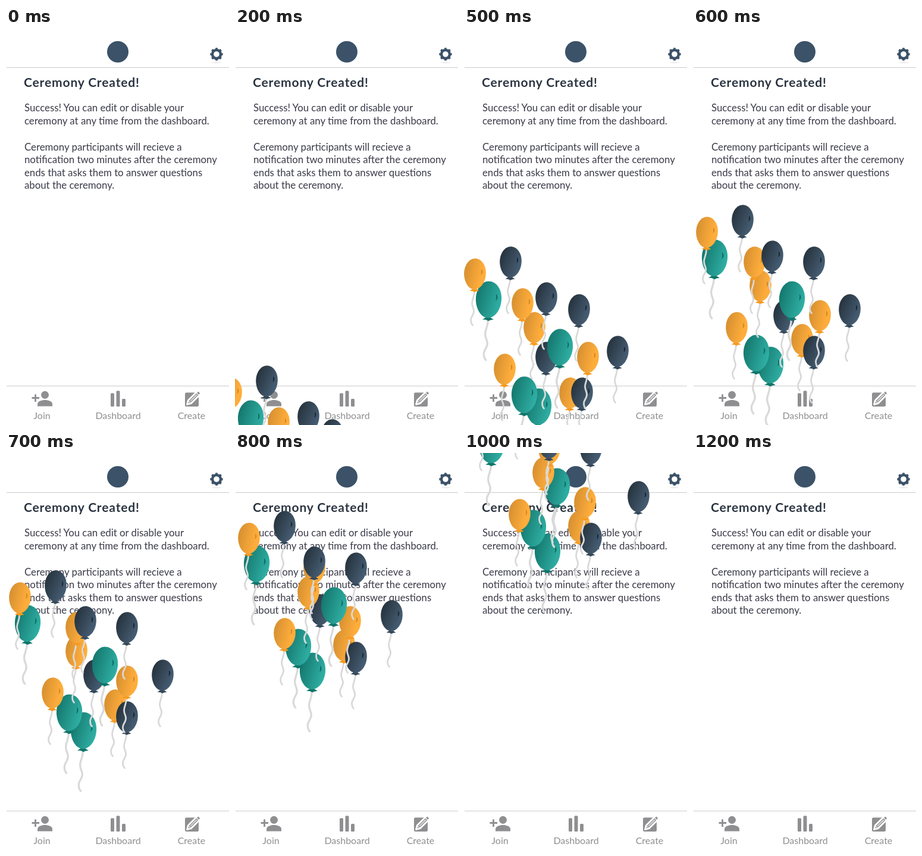
These frames come from a looping animation (375x667 px, 1400 ms). An HTML page:

```html
<!DOCTYPE html>
<html lang="en">
<head>
<meta charset="utf-8">
<title>Ceremony Created</title>
<style>
  html, body { margin: 0; width: 100%; height: 100%; overflow: hidden; background: #fff; }
  svg { display: block; }
  text { font-family: Lato, "Open Sans", sans-serif; font-size: 16px; }
  .title { font-size: 21px; font-weight: 700; letter-spacing: .85px; fill: #2b3441; }
  .body text { font-size: 16.8px; fill: #3a3a49; }
  .tabs { fill: #8f8f91; }
  .tabs text { text-anchor: middle; }
  .rule { stroke: #cbcbcb; }
  .dark { --skin: url(#darkSkin); --knot: #34495a; --glint: #111c25; }
  .gold { --skin: url(#goldSkin); --knot: #f79a20; --glint: #c57c1d; }
  .teal { --skin: url(#tealSkin); --knot: #10766b; --glint: #0b665d; }
</style>
</head>
<body>
<svg width="375" height="667" viewBox="0 0 375 667">
  <defs>
    <linearGradient id="darkSkin" x1="0" y1=".2" x2="1" y2=".8">
      <stop offset=".08" stop-color="#27343f"/><stop offset="1" stop-color="#4a637a"/>
    </linearGradient>
    <linearGradient id="goldSkin" x1="0" y1=".35" x2="1" y2=".65">
      <stop offset=".05" stop-color="#d89131"/><stop offset=".8" stop-color="#fead3b"/>
    </linearGradient>
    <linearGradient id="tealSkin" x1="0" y1=".3" x2="1" y2=".7">
      <stop offset=".05" stop-color="#15796f"/><stop offset=".95" stop-color="#30b0a5"/>
    </linearGradient>
    <g id="balloon">
      <path d="M-1 29C-1 39-5 42-5 49S-1 58-2 64-7 72-7 77-6 84-4 86" fill="none" stroke="#d9d9d9" stroke-width="2.8" stroke-linecap="round"/>
      <path d="M-1 23L7 28.5Q3 28.5-.5 30.5Q-4 28-9 28.500Z" fill="var(--knot)"/>
      <path d="M0-26C10.500-26 18.300-15.500 18.300-2C18.300 13 9.500 26-1 26C-10.500 26-18.300 14-18.300-.5C-18.300-14.500-10-26 0-26Z" fill="var(--skin)"/>
      <path d="M11-7.500Q14-3 10.500 1Q11.500-3 11-7.500Z" fill="var(--glint)" stroke="var(--glint)" stroke-width=".5"/>
    </g>
  </defs>

  <circle cx="188" cy="40" r="18" fill="#3b5268"/>
  <ellipse cx="354" cy="58" rx="8" ry="1.500" fill="#eee"/>
  <g fill="none" stroke="#3b5268">
    <circle cx="354" cy="44" r="7" stroke-width="4.400"/>
    <circle cx="354" cy="44" r="9.500" stroke-width="2.400" pathLength="16" stroke-dasharray="1 1" stroke-dashoffset=".5"/>
  </g>
  <path class="rule" d="M1 66.500H375M1 601.500H375"/>

  <text class="title" x="30" y="99">Ceremony Created!</text>
  <g class="body">
    <text x="31" y="140">Success! You can edit or disable your</text>
    <text x="31" y="162">ceremony at any time from the dashboard.</text>
    <text x="31" y="206">Ceremony participants will recieve a</text>
    <text x="31" y="227">notification two minutes after the ceremony</text>
    <text x="31" y="249">ends that asks them to answer questions</text>
    <text x="31" y="270">about the ceremony.</text>
  </g>

  <g class="tabs">
    <circle cx="65.500" cy="616.500" r="6.500"/>
    <path d="M53 635.500V632C53 627 60 625 65.500 625S78 627 78 632V635.500Z"/>
    <path d="M43.500 621.500H56M49.500 615.500V628" stroke="#8f8f91" stroke-width="2.800"/>
    <rect x="176" y="613.500" width="6" height="22.500" rx="1.500"/>
    <rect x="185.500" y="609.500" width="6" height="26.500" rx="1.500"/>
    <rect x="195" y="623" width="6" height="13" rx="1.500"/>
    <rect x="301" y="612.500" width="23" height="23.500" rx="2.500"/>
    <g transform="translate(304.500 632.500) rotate(-45)" stroke-linejoin="round">
      <path d="M0 0L6-3.500H28Q30-3.500 30-2V2Q30 3.500 28 3.500H6Z" stroke="#fff" stroke-width="2.800"/>
      <path d="M6-2L6 2M8 0H23M25-3V3" stroke="#fff" stroke-width="1.200"/>
    </g>
    <text x="60.500" y="657">Join</text>
    <text x="188.500" y="657">Dashboard</text>
    <text x="312" y="657">Create</text>
  </g>
  <g id="sky" transform="translate(.5 .3)"></g>
</svg>
<script>
const LOOP = 1400, STEP = 100, LEG = 200, LAST_STEP = 11;

// x, y: place at 600 ms; enter, mid, exit: sideways shifts at 400, 800 and 1000 ms.
// low: extra depth while entering; lift: extra height after 600 ms. Back to front.
const balloons = [
  { tint: "teal", x: 130, y: 566 },
  { tint: "teal", x: 106, y: 546, lift: 20 },
  { tint: "gold", x: 183, y: 523, low: 40 },
  { tint: "dark", x: 203, y: 543 },
  { tint: "dark", x: 153, y: 483, enter: -30, mid: -10, exit: 0, lift: 20 },
  { tint: "dark", x: 263, y: 473, exit: 30 },
  { tint: "gold", x: 73, y: 503, mid: 10, exit: 20 },
  { tint: "gold", x: 213, y: 483, mid: -20, exit: -10 },
  { tint: "teal", x: 166, y: 456, exit: -10, low: 20 },
  { tint: "dark", x: 203, y: 393, enter: -20, low: 20 },
  { tint: "gold", x: 113, y: 433, enter: 10, mid: 10, exit: 20 },
  { tint: "teal", x: 36, y: 386, enter: 10 },
  { tint: "gold", x: 103, y: 393, mid: 30, exit: 40 },
  { tint: "dark", x: 133, y: 383, enter: 10 },
  { tint: "gold", x: 23, y: 343 },
  { tint: "dark", x: 83, y: 323 },
];

function route({ x, y, enter = -10, mid = 0, exit = 10, low = 0, lift = 0 }) {
  return [
    [x + enter - 20, y + 270 + low],
    [x + enter, y + 140 + low],
    [x, y],
    [x + mid, y - 200 - lift],
    [x + exit, y - 400 - lift],
  ];
}

// Linear along each leg, continued past both ends.
function placeAt(points, time) {
  const pos = time / LEG - 1;
  const i = Math.max(0, Math.min(points.length - 2, Math.floor(pos)));
  return points[i].map((from, axis) => from + (points[i + 1][axis] - from) * (pos - i));
}

const sky = document.getElementById("sky");
const flock = balloons.map(balloon => {
  const node = document.createElementNS("http://www.w3.org/2000/svg", "use");
  node.setAttribute("href", "#balloon");
  node.setAttribute("class", balloon.tint);
  sky.append(node);
  return { node, points: route(balloon), scale: balloon.tint === "teal" ? 1.18 : 1 };
});

function draw() {
  const step = Math.floor(performance.now() % LOOP / STEP);
  const flying = step >= 1 && step <= LAST_STEP;
  sky.setAttribute("visibility", flying ? "visible" : "hidden");
  if (flying) {
    for (const { node, points, scale } of flock) {
      const [x, y] = placeAt(points, step * STEP);
      node.setAttribute("transform", `translate(${x} ${y}) scale(${scale})`);
    }
  }
  requestAnimationFrame(draw);
}
draw();
</script>
</body>
</html>
```
